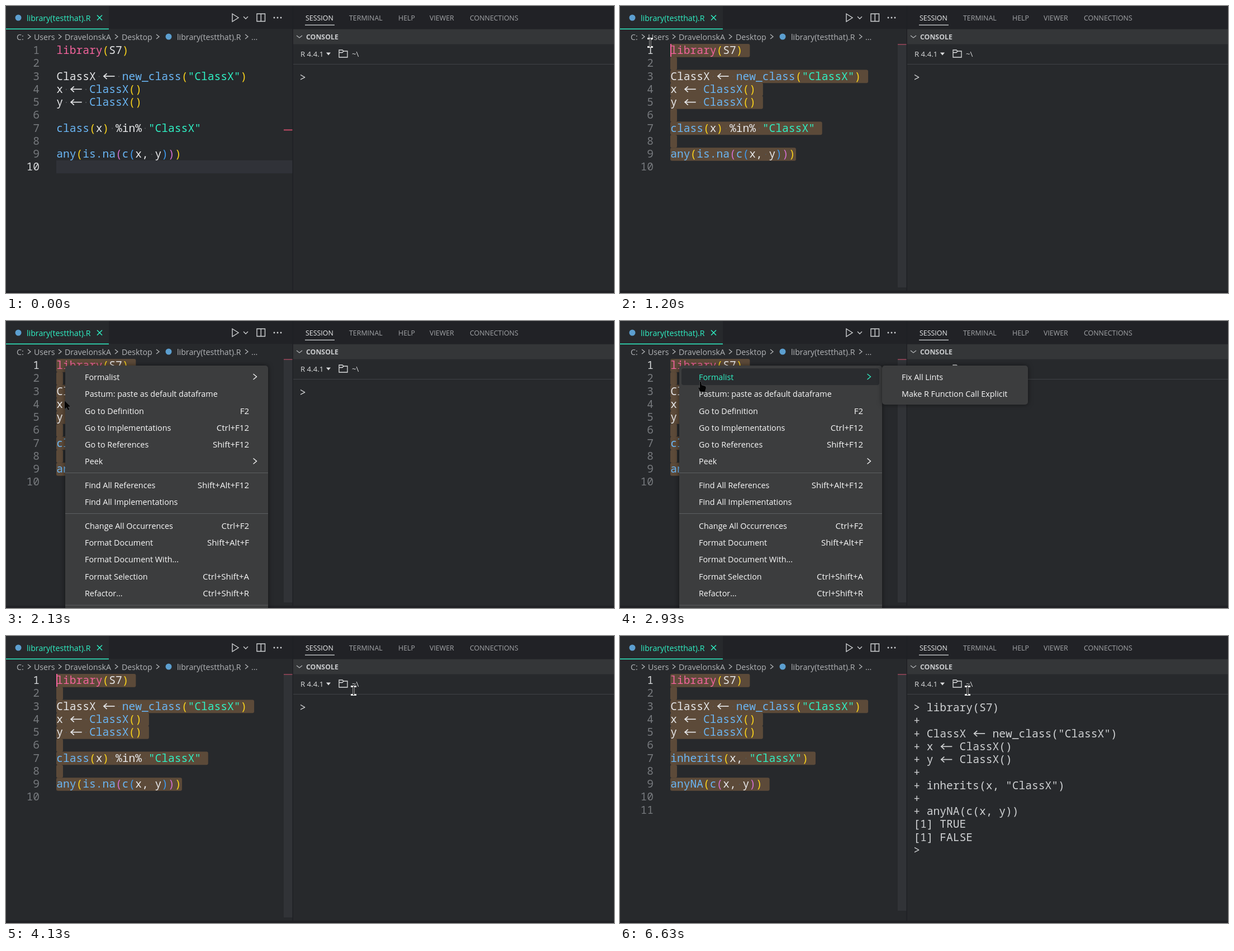
Recreate the animation shown at these times as an HTML page with a canvas. Size 1088 by 515 pixels, loop 6.9 s.

```html
<!DOCTYPE html>
<html lang="en">
<head>
<meta charset="utf-8">
<title>Lint fixing in an editor</title>
<style>
  html, body { margin: 0; width: 100%; height: 100%; overflow: hidden; background: #27292c; }
  canvas { display: block; }
</style>
</head>
<body>
<canvas id="stage" width="1088" height="515"></canvas>
<script>
const ctx = document.getElementById('stage').getContext('2d');
const LOOP = 6900, ROW = 23.27, CELL = 11.76, CODE_X = 90.2, CODE_Y = 68;
const TEAL = '#2ff0c4', PINK = '#f2639c', BLUE = '#6ab6f5', WHITE = '#e6e7e9', GREY = '#b2b4b7';
const MENU_INK = '#fafafa', CONSOLE_INK = '#cfd1d3';
const BRACKETS = ['#f9d21c', '#d36fd0', '#3f9bf0'];
const UI = '"Open Sans", sans-serif', MONO = '19.6px "Noto Sans Mono", monospace';

const HEAD = ['library(S7)', '', 'ClassX <- new_class("ClassX")', 'x <- ClassX()', 'y <- ClassX()', ''];
const BEFORE = [...HEAD, 'class(x) %in% "ClassX"', '', 'any(is.na(c(x, y)))', ''];
const AFTER = [...HEAD, 'inherits(x, "ClassX")', '', 'anyNA(c(x, y))', '', ''];
const OUTPUT = [...AFTER.slice(0, 9).map((s, i) => (i ? '+ ' : '> ') + s), '[1] TRUE', '[1] FALSE', '>'];

const MENU = [
  [100, 'Formalist', '>'], [130.5, 'Pastum: paste as default dataframe'], [161, 'Go to Definition', 'F2'],
  [191, 'Go to Implementations', 'Ctrl+F12'], [221, 'Go to References', 'Shift+F12'], [251.5, 'Peek', '>'],
  [294, 'Find All References', 'Shift+Alt+F12'], [324, 'Find All Implementations'],
  [367, 'Change All Occurrences', 'Ctrl+F2'], [397, 'Format Document', 'Shift+Alt+F'],
  [427.5, 'Format Document With...'], [458, 'Format Selection', 'Ctrl+Shift+A'], [488, 'Refactor...', 'Ctrl+Shift+R']
];

// Pointer path: time, x, y
const PATH = [
  [30, 400, 530], [430, 318, 268], [630, 318, 268], [1200, 54, 66], [1300, 51, 60], [1330, 51, 60],
  [1800, 105, 143], [2530, 105, 143], [2720, 130, 146], [2860, 145, 109], [2930, 145, 109],
  [3200, 160, 108], [3600, 622, 98], [LOOP, 622, 98]
];

const clamp = (v, lo, hi) => Math.max(lo, Math.min(hi, v));
const ramp = (t, a, b) => clamp((t - a) / (b - a), 0, 1);
const within = (t, ...spans) => spans.some(([a, b]) => t >= a && t < b);

function pointerAt(t) {
  const i = PATH.findIndex(p => p[0] > t);
  if (i < 1) return null;
  const [t0, x0, y0] = PATH[i - 1], [t1, x1, y1] = PATH[i];
  const u = ramp(t, t0, t1), e = u * u * (3 - 2 * u);
  return { x: x0 + (x1 - x0) * e, y: y0 + (y1 - y0) * e };
}

function rect(color, x, y, w, h, r = 0) {
  ctx.fillStyle = color;
  ctx.beginPath();
  ctx.roundRect(x, y, w, h, r);
  ctx.fill();
}

function trace(points, close) {
  ctx.beginPath();
  for (let i = 0; i < points.length; i += 2) ctx.lineTo(points[i], points[i + 1]);
  if (close) ctx.closePath();
}

function stroke(color, width, points, close) {
  trace(points, close);
  ctx.strokeStyle = color;
  ctx.lineWidth = width;
  ctx.stroke();
}

function dot(color, x, y, r) {
  ctx.fillStyle = color;
  ctx.beginPath();
  ctx.arc(x, y, r, 0, 7);
  ctx.fill();
}

// Text with its capitals centred on y
function label(text, x, y, size, color, align = 'left', weight = 400) {
  ctx.font = `${weight} ${size}px ${UI}`;
  ctx.textAlign = align;
  ctx.fillStyle = color;
  ctx.fillText(text, x, y + size * 0.357);
}

const chevron = (x, y, color, s = 4) => stroke(color, 1.3, [x - s / 2, y - s, x + s / 2 + 1, y, x - s / 2, y + s]);
const chevronDown = (x, y, color, s = 4) => stroke(color, 1.3, [x - s, y - 2, x, y + 2, x + s, y - 2]);

function code(text, x, baseline, plain) {
  let depth = 0;
  ctx.font = MONO;
  ctx.textAlign = 'left';
  for (const m of text.matchAll(/"[^"]*"|<-|[\w.]+|[()]| |[^\s\w"()]+/g)) {
    const s = m[0], tx = x + m.index * CELL;
    let color = WHITE;
    if (s === ' ') {
      if (!plain) dot('#55575b', tx + CELL / 2, baseline - 6, 1);
      continue;
    }
    if (s === '<-') {
      const y = baseline - 6.5, ink = plain ? CONSOLE_INK : WHITE;
      stroke(ink, 1.7, [tx + 2, y, tx + 22, y]);
      stroke(ink, 1.7, [tx + 8, y - 5, tx + 2.5, y, tx + 8, y + 5]);
      continue;
    }
    if (s === '(') color = BRACKETS[depth++ % 3];
    else if (s === ')') color = BRACKETS[--depth % 3];
    else if (s[0] === '"') color = TEAL;
    else if (s === 'library') color = PINK;
    else if (text[m.index + s.length] === '(') color = BLUE;
    ctx.fillStyle = plain ? CONSOLE_INK : color;
    ctx.fillText(s, tx, baseline);
  }
}

function drawChrome() {
  rect('#27292c', 0, 0, 1088, 515);
  rect('#212226', 184, 0, 904, 41);
  rect(TEAL, 0, 40.5, 184, 1.5);
  dot('#5c9fd0', 22, 21, 5.5);
  label('library(testthat).R', 37, 22, 14.2, TEAL);
  stroke(TEAL, 1.4, [163, 16.5, 172, 25.5]);
  stroke(TEAL, 1.4, [172, 16.5, 163, 25.5]);

  stroke('#d0d2d4', 1.4, [405, 14, 416, 21, 405, 28], true);
  chevronDown(429, 21, '#d0d2d4');
  stroke('#d0d2d4', 1.4, [449, 14, 463.5, 14, 463.5, 27.5, 449, 27.5], true);
  stroke('#d0d2d4', 1.4, [456.3, 14, 456.3, 27.5]);
  for (const x of [480, 486, 492]) dot('#d0d2d4', x, 21, 1.4);

  for (const [text, x] of [['C:', 19], ['Users', 50], ['DravelonskA', 105], ['Desktop', 207], ['library(testthat).R', 306], ['...', 439]])
    label(text, x, 55.5, 14.2, GREY);
  for (const x of [41, 96, 197, 271, 430]) chevron(x, 55, GREY);
  dot('#5c9fd0', 291, 55, 5.5);
}

function drawPanel(t) {
  for (const [text, x] of [['SESSION', 536], ['TERMINAL', 614], ['HELP', 702], ['VIEWER', 758], ['CONNECTIONS', 830]])
    label(text, x, 22, 12.4, x === 536 ? '#eeeff0' : '#a3a5a8');
  rect('#d8dadb', 535, 33.5, 53, 1.2);
  rect('#343638', 514, 42, 574, 26.5);
  chevronDown(525, 55, GREY, 5);
  label('CONSOLE', 537, 55.5, 12.3, '#c9cbcd', 'left', 700);

  label('R 4.4.1', 527, 86.5, 13.2, '#dcddde');
  trace([573, 83.5, 581, 83.5, 577, 88.5], true);
  ctx.fillStyle = '#dcddde';
  ctx.fill();
  stroke('#dcddde', 1.3, [596, 79, 602, 79, 604, 81, 611, 81, 611, 92, 596, 92], true);
  stroke('#dcddde', 1.3, [596, 83.5, 602, 83.5, 604, 81]);
  label('~\\', 619, 86.5, 13.2, '#dcddde');
  rect('#404246', 514, 104, 574, 1);

  const rows = t < 5900 ? ['>'] : OUTPUT.slice(0, t < 6000 ? 9 : t < 6070 ? 10 : 12);
  rows.forEach((text, i) => code(text, 525.3, 135 + i * ROW, true));
  rect('#1f2024', 512.5, 0, 1.5, 515);
  rect('#202125', 0, 511, 1088, 4);
}

function drawEditor(t, pointer) {
  const fixed = t >= 4170, lines = fixed ? AFTER : BEFORE, selecting = t >= 630;
  let active = 9, col = 0;
  if (selecting) {
    const dragging = t < 1300;
    active = dragging ? clamp(Math.floor((pointer.y - CODE_Y) / ROW), 0, 8) : 0;
    col = dragging ? clamp(Math.round((pointer.x - CODE_X) / CELL), 0, lines[active].length) : 0;
    for (let i = active; i < 9; i++) {
      const from = i === active ? col : 0, length = lines[i].length - from;
      const tail = i === 8 && !fixed ? 1.5 : length ? 13 : 12;
      rect('#5c4a39', 90 + from * CELL, CODE_Y + i * ROW, length * CELL + tail, ROW + 0.4, 3);
    }
  } else {
    rect('#303238', 90, CODE_Y + 9 * ROW - 0.5, 423, ROW);
  }

  lines.forEach((text, i) => {
    const baseline = CODE_Y + 18 + i * ROW;
    code(text, CODE_X, baseline);
    ctx.font = MONO;
    ctx.textAlign = 'right';
    ctx.fillStyle = i === active ? '#d6d8da' : '#76797d';
    ctx.fillText(i + 1, 60, baseline);
  });

  const hover = ramp(t, 30, 230);
  ctx.globalAlpha = hover;
  rect('#313337', 497, CODE_Y, 16, fixed ? 425 : 437);
  ctx.globalAlpha = 1 - hover * 0.45;
  rect('#c44b66', 497, CODE_Y + active * 17.05, 16, 2);
  ctx.globalAlpha = 1;

  if (within(t, [630, 1800], [3930, 4670], [5170, 5670], [6170, 6630]))
    rect(PINK, 90 + col * CELL, CODE_Y + active * ROW, 2, ROW);
}

function menuBox(x, y, w, h) {
  ctx.shadowColor = 'rgba(0,0,0,.5)';
  ctx.shadowBlur = 9;
  rect('#3c3d3e', x, y, w, h, 5);
  ctx.shadowBlur = 0;
}

function menuItem(x, y, text, lit, left, width) {
  if (lit) rect('#2a2c2f', left, y - 15, width, 30, 4);
  label(text, x, y + 0.5, 14.35, lit ? TEAL : MENU_INK);
}

function drawMenus(t, pointer) {
  const submenu = t >= 2900;
  menuBox(106, 80, 363, 450);
  for (const [y, text, hint] of MENU) {
    const lit = submenu ? y === 100 : pointer.x > 112 && Math.abs(pointer.y - y) < 15;
    menuItem(141, y, text, lit, 110, 354);
    if (hint === '>') chevron(445, y, lit ? TEAL : MENU_INK, 5);
    else if (hint) label(hint, 435, y + 0.5, 15, MENU_INK, 'right');
  }
  for (const y of [272, 345, 509.5]) rect('#5d5f61', 106, y, 363, 1);
  if (!submenu) return;
  menuBox(469, 80, 261, 70);
  menuItem(504, 100, 'Fix All Lints', pointer.x > 473, 473, 252);
  menuItem(504, 130.5, 'Make R Function Call Explicit', false, 473, 252);
}

function drawTooltip(t) {
  ctx.globalAlpha = ramp(t, 4440, 4500) * (1 - ramp(t, 5600, 5670));
  rect('#27292c', 628.5, 109.5, 28, 24);
  stroke('#77797c', 1, [628.5, 109.5, 656.5, 109.5, 656.5, 133.5, 628.5, 133.5], true);
  label('~\\', 636, 122, 12, '#c4c6c8');
  ctx.globalAlpha = 1;
}

function drawPointer(t, { x, y }) {
  ctx.save();
  ctx.translate(x, y);
  if (!within(t, [2100, 3900])) {
    rect('#e8e8e8', -5, -9, 10, 3);
    rect('#e8e8e8', -5, 6, 10, 3);
    rect('#e8e8e8', -1.5, -7, 3, 14);
    rect('#0c0c0d', -0.8, -8, 1.6, 16);
  } else {
    const arrow = [0, 0, 0, 15, 3.5, 12, 6, 17, 8.5, 16, 6, 11, 10.5, 10.5];
    const hand = [-2, 0, 0, 0, 1, 6, 8, 8, 9, 11, 7, 18, -1, 18, -5, 11, -3, 10, -2, 12];
    stroke('#606265', 1, x > 112 ? hand : arrow, true);
    ctx.fillStyle = '#050505';
    ctx.fill();
  }
  ctx.restore();
}

function render(t) {
  const pointer = pointerAt(t);
  drawChrome();
  drawEditor(t, pointer);
  drawPanel(t);
  if (within(t, [2100, 3930])) drawMenus(t, pointer);
  drawTooltip(t);
  if (pointer) drawPointer(t, pointer);
}

const start = performance.now();
function tick() {
  render((performance.now() - start) % LOOP);
  requestAnimationFrame(tick);
}
tick();
</script>
</body>
</html>
```
